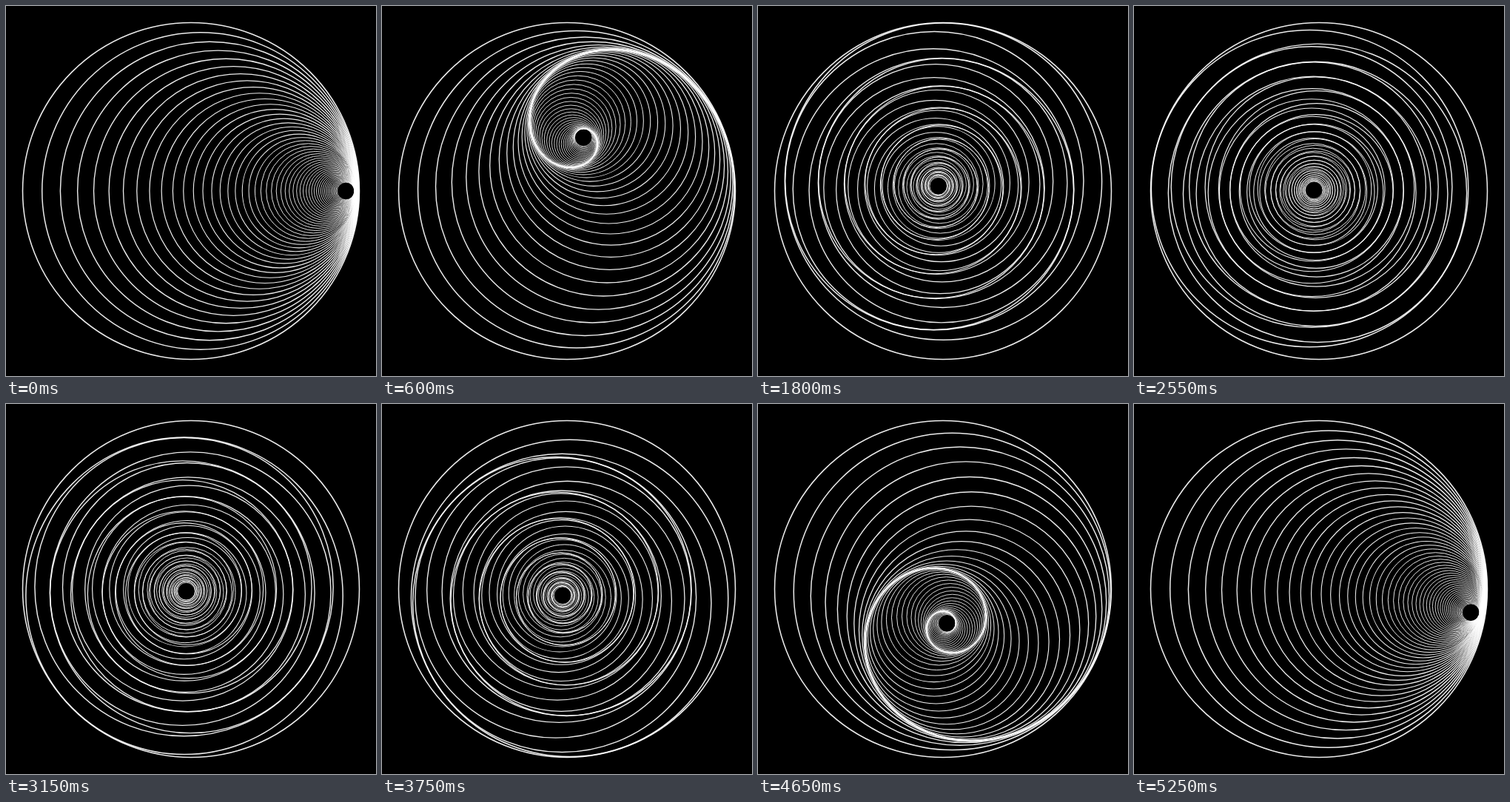
These frames come from a looping animation (500x500 px, 5400 ms). An HTML page with a canvas:

```html
<!DOCTYPE html>
<html lang="en">
<head>
<meta charset="utf-8">
<title>Nested circles</title>
<style>
  html, body { margin: 0; width: 100%; height: 100%; overflow: hidden; background: #000; }
  canvas { display: block; width: 500px; height: 500px; }
</style>
</head>
<body>
<canvas id="stage" width="500" height="500"></canvas>
<script>
const ctx = document.getElementById('stage').getContext('2d');
const LOOP = 5400, STEP = 150;
const COUNT = 50, RADIUS = 227.5, SHRINK = 0.9415, REACH = 0.97;
const RAMP = 0.35;

// Constant acceleration, steady speed, constant deceleration.
function ease(s) {
  if (s > 0.5) return 1 - ease(1 - s);
  const a = 0.5 / (RAMP * (1 - RAMP));
  return s < RAMP ? a * s * s : a * RAMP * (2 * s - RAMP);
}

function draw(turn) {
  ctx.fillStyle = '#000';
  ctx.fillRect(0, 0, 500, 500);
  ctx.strokeStyle = 'rgba(255, 255, 255, 0.92)';
  let x = 250, y = 250, r = RADIUS;
  for (let k = 1; k <= COUNT; k++) {
    ctx.lineWidth = 0.75 + 0.8 * r / RADIUS;
    ctx.beginPath();
    ctx.arc(x, y, r, 0, 2 * Math.PI);
    ctx.stroke();
    // Each circle nearly touches its parent, at an angle that grows with depth.
    const shift = REACH * r * (1 - SHRINK);
    x += shift * Math.cos(k * turn);
    y -= shift * Math.sin(k * turn);
    r *= SHRINK;
  }
}

const start = performance.now();
let shown = -1;

function tick() {
  const time = Math.max(0, performance.now() - start) % LOOP;
  const step = Math.floor(time / STEP);
  if (step !== shown) {
    shown = step;
    draw(2 * Math.PI * ease(step * STEP / LOOP));
  }
  requestAnimationFrame(tick);
}
tick();
</script>
</body>
</html>
```
